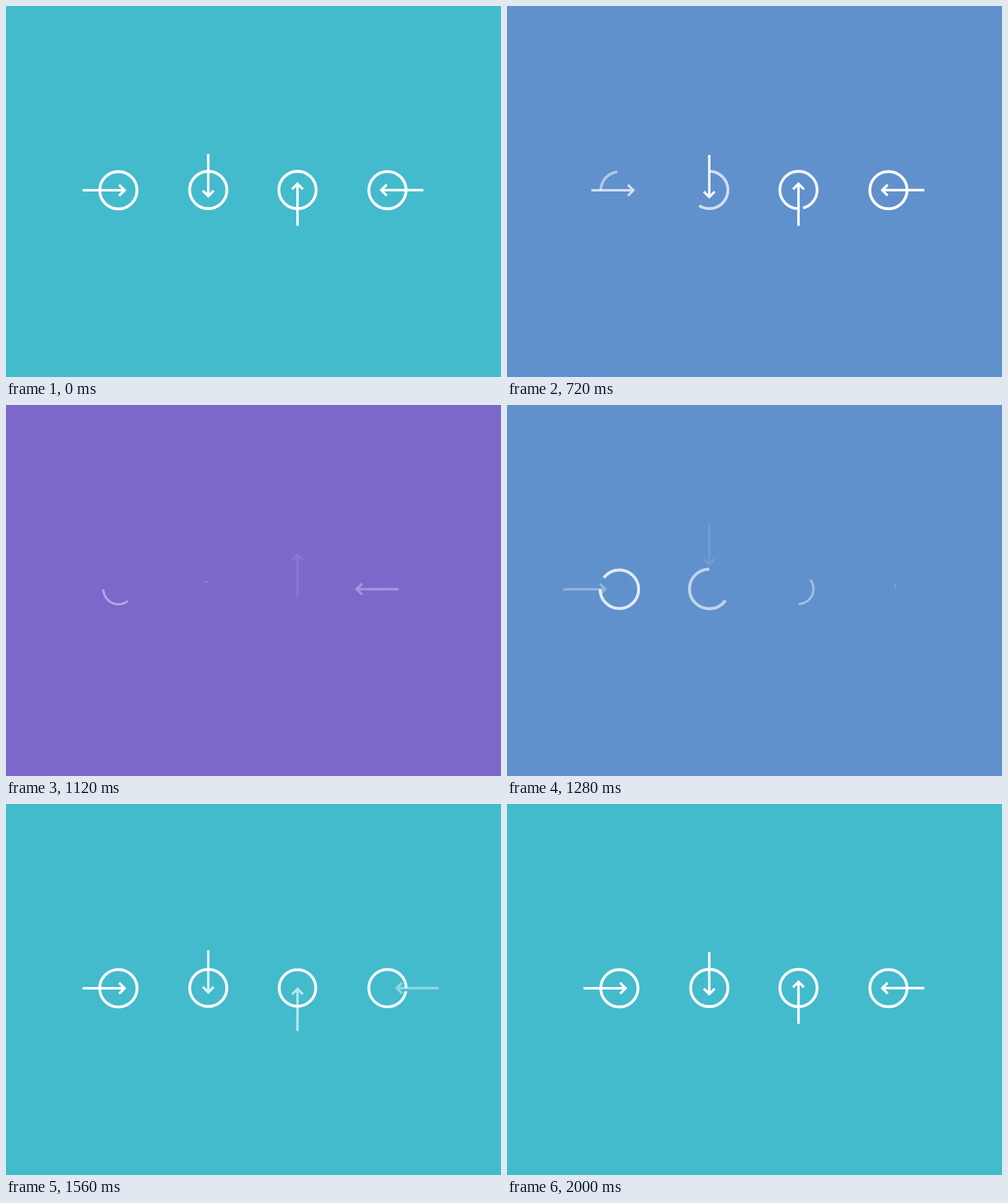
Write an HTML page with a canvas that moves like this. It is 800 by 600 pixels and loops after 2.04 s.

```html
<!DOCTYPE html>
<html lang="en">
<head>
<meta charset="utf-8">
<title>Arrows and rings</title>
<style>
  html, body { margin: 0; width: 100%; height: 100%; overflow: hidden; background: #43bbcd; }
  canvas { display: block; }
</style>
</head>
<body>
<canvas id="stage" width="800" height="600"></canvas>
<script>
const LOOP = 2040, STAGGER = 80, FADE = 400, TAU = Math.PI * 2;
const TEAL = [67, 187, 205], PURPLE = [125, 103, 203];
const icons = [
  { x: 181.6, y: 298, turn: 0 },
  { x: 326.9, y: 297.5, turn: Math.PI / 2 },
  { x: 471.1, y: 297.5, turn: -Math.PI / 2 },
  { x: 616.5, y: 297.8, turn: Math.PI }
];
const ctx = document.getElementById('stage').getContext('2d');

const progress = (t, start, length) => Math.min(1, Math.max(0, (t - start) / length));

// Cubic bezier easing with handles (a, 0) and (b, 1).
function ease(p, a, b) {
  let low = 0, high = 1, s = 0.5;
  for (let i = 0; i < 20; i++) {
    const r = 1 - s;
    const x = 3 * r * r * s * a + 3 * r * s * s * b + s * s * s;
    if (x < p) low = s; else high = s;
    s = (low + high) / 2;
  }
  return s * s * (3 - 2 * s);
}

// Linear growth that overshoots and rings out.
function spring(ms) {
  const after = (ms - 200) / 1000;
  return after < 0 ? ms / 200 : 1 + 0.125 * Math.sin(TAU * 3 * after) * Math.exp(-8 * after);
}

function ring(t) {
  const leaving = t < 940;
  const p = progress(t, leaving ? 520 : 960, FADE);
  const scale = leaving ? 1 - progress(t, 720, 200) : spring(Math.max(0, t - 960));
  const sweep = TAU * (leaving ? 1 - ease(p, 0.33, 0.25) : ease(p, 1 / 3, 2 / 3));
  const alpha = leaving ? 1 - p : p;
  if (alpha <= 0 || scale <= 0) return;
  ctx.save();
  ctx.globalAlpha = alpha;
  ctx.scale(scale, scale);
  ctx.lineWidth = 4.6;
  ctx.beginPath();
  ctx.arc(0, 0, 30.1, Math.PI, Math.PI + (leaving ? sweep : -sweep), !leaving);
  ctx.stroke();
  ctx.restore();
}

function arrow(t) {
  const leaving = t < 1080;
  const p = progress(t, leaving ? 600 : 1160, FADE);
  const shift = leaving
    ? 45.5 * ease(p, 0.33, 0.48)
    : -50 * (1 - Math.sin(progress(t, 1200, 360) * Math.PI / 2));
  ctx.save();
  ctx.globalAlpha = leaving ? 1 - p : p;
  ctx.translate(shift, 0);
  ctx.lineWidth = 4;
  ctx.beginPath();
  ctx.moveTo(-58, 0);
  ctx.lineTo(10, 0);
  ctx.moveTo(1.2, -8.8);
  ctx.lineTo(10, 0);
  ctx.lineTo(1.2, 8.8);
  ctx.stroke();
  ctx.restore();
}

function draw(now) {
  const time = now % LOOP;
  const tint = progress(time, 560, 320) - progress(time, 1120, 320);
  const color = TEAL.map((c, i) => Math.round(c + (PURPLE[i] - c) * tint));
  ctx.fillStyle = `rgb(${color})`;
  ctx.fillRect(0, 0, 800, 600);
  ctx.strokeStyle = '#fff';
  icons.forEach(({ x, y, turn }, i) => {
    const t = time - i * STAGGER;
    ctx.save();
    ctx.translate(x, y);
    ctx.rotate(turn);
    ring(t);
    arrow(t);
    ctx.restore();
  });
}

const begin = performance.now();
function tick() {
  draw(performance.now() - begin);
  requestAnimationFrame(tick);
}
tick();
</script>
</body>
</html>
```
